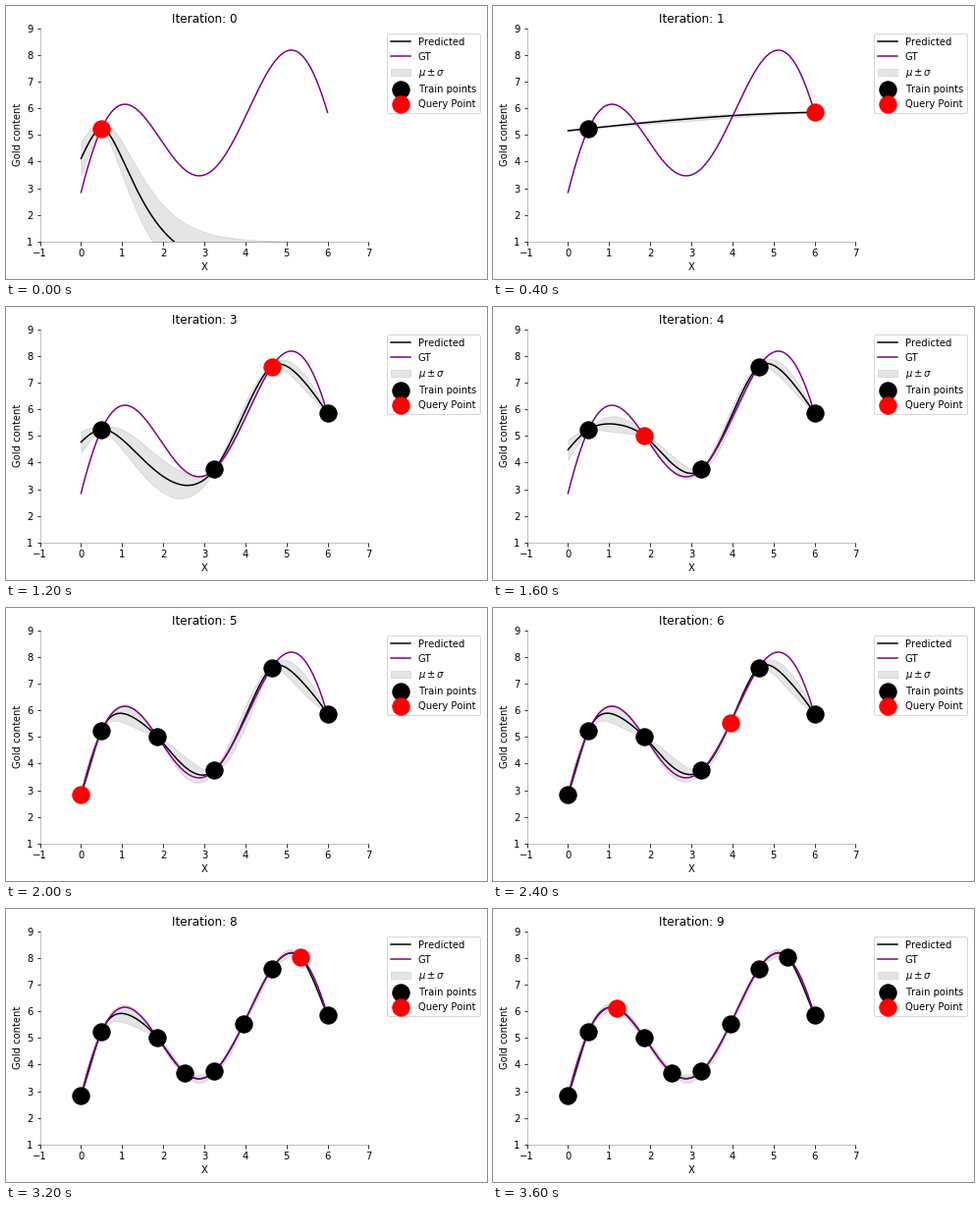
A matplotlib script that plays this animation: 490x278 px, repeating every 4000 ms.

```python
import numpy as np
import matplotlib.pyplot as plt
from matplotlib.animation import FuncAnimation

W, H, DPI = 490, 278, 72
LEFT, BOTTOM, AX_W, AX_H = 34.6, 38.0, 334.8, 217.44

plt.rcParams["font.family"] = "DejaVu Sans"
plt.rcParams["text.kerning_factor"] = 6

queries = np.array([0.5, 6, 3.25, 4.645, 1.86, 0, 3.95, 2.53, 5.335, 1.185])
grid = np.linspace(0, 6, 601)
scales = np.geomspace(0.5, 60, 1500)


def truth(x):
    return 2 * (x - 3) * np.sin(x - 3) + 0.5 * x + 2


def matern(a, b, scale):
    """Matern 3/2 covariance with unit variance."""
    d = np.sqrt(3) * np.abs(a[:, None] - b[None, :]) / scale
    return (1 + d) * np.exp(-d)


def best_scale(x, y):
    """Length scale with the highest marginal likelihood."""
    if len(x) == 1:
        return 1.0

    def score(scale):
        k = matern(x, x, scale)
        return -y @ np.linalg.solve(k, y) - np.linalg.slogdet(k)[1]

    return max(scales, key=score)


def posterior(x):
    y = truth(x)
    scale = best_scale(x, y)
    k = matern(x, x, scale) + 1e-10 * np.eye(len(x))
    ks = matern(grid, x, scale)
    mean = ks @ np.linalg.solve(k, y)
    var = 1 - np.sum(ks * np.linalg.solve(k, ks.T).T, axis=1)
    return mean, np.sqrt(np.maximum(var, 0))


fits = [posterior(queries[:n + 1]) for n in range(len(queries))]

fig = plt.figure(figsize=(W / DPI, H / DPI), dpi=DPI, facecolor="white")
ax = fig.add_axes([LEFT / W, BOTTOM / H, AX_W / W, AX_H / H])
ax.set(xlim=(-1, 7), ylim=(1, 9), xlabel="X", ylabel="Gold content")
for side, alpha in dict(top=0, right=0, left=0.3, bottom=0.3).items():
    ax.spines[side].set_alpha(alpha)

pred, = ax.plot(grid, truth(grid), color="black", label="Predicted")
ax.plot(grid, truth(grid), color="purple", label="GT")
band = ax.fill_between(grid, grid, grid, color="gray", alpha=0.2,
                       label=r"$\mu \pm \sigma$")
train = ax.scatter([], [], s=300, color="black", zorder=3,
                   label="Train points")
query = ax.scatter([], [], s=300, color="red", zorder=4,
                   label="Query Point")
title = ax.set_title("Iteration: 0")
ax.legend(loc="upper left", bbox_to_anchor=(1.04, 1))


def update(n):
    mean, std = fits[n]
    points = np.column_stack([queries, truth(queries)])
    pred.set_ydata(mean)
    lower = np.column_stack([grid, mean - std])
    upper = np.column_stack([grid, mean + std])
    band.set_verts([np.vstack([lower, upper[::-1]])])
    train.set_offsets(points[:n])
    query.set_offsets(points[n:n + 1])
    title.set_text(f"Iteration: {n}")
    return pred, band, train, query, title


anim = FuncAnimation(fig, update, frames=len(queries), interval=400,
                     repeat=True, repeat_delay=0, blit=False)
plt.show()
```
